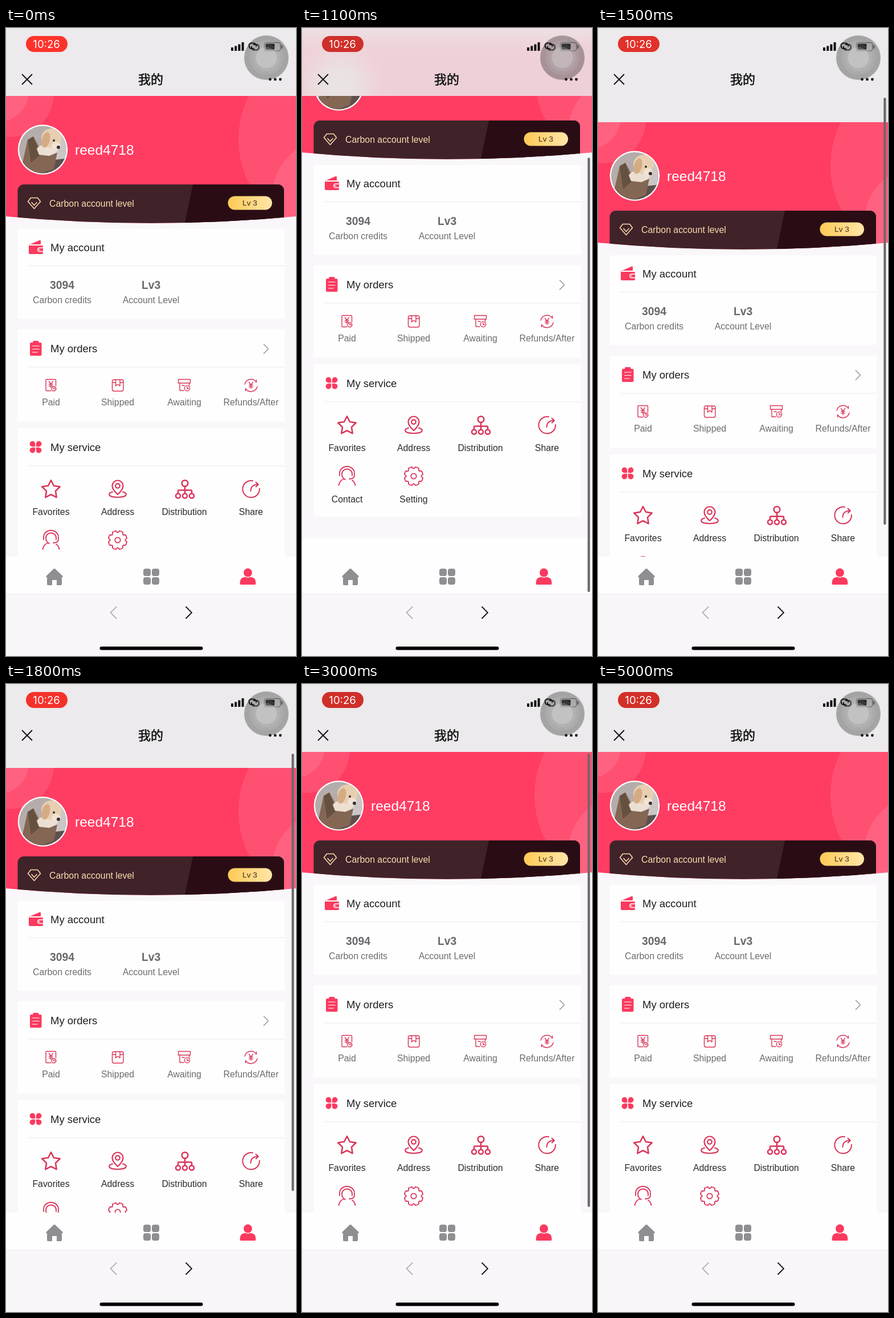
Recreate the animation shown at these times as an HTML page. Size 509 by 1100 pixels, loop 5.1 s.

```html
<!DOCTYPE html>
<html lang="en">
<head>
<meta charset="utf-8">
<title>Account page</title>
<style>
  html, body { margin: 0; width: 100%; height: 100%; overflow: hidden; background: #eceaec; }
  svg { display: block; width: 509px; height: 1100px; font-family: "Liberation Sans", Arial, sans-serif; }
  .h { font-size: 18.5px; fill: #1f1f22; }
  .num { font-size: 19.3px; font-weight: bold; fill: #68686c; }
  .sub { font-size: 15.85px; fill: #6c6c70; }
  .item { font-size: 15.85px; fill: #2a2a2d; }
  .mid { text-anchor: middle; }
  .line { fill: none; stroke: #da3358; stroke-linecap: round; stroke-linejoin: round; }
  .thin { stroke-width: 1.4; }
  .bold { stroke-width: 2.5; }
  .solid { fill: #fb3a5f; }
</style>
</head>
<body>
<svg viewBox="0 0 509 1100">
  <defs>
    <linearGradient id="gold"><stop stop-color="#ffca55"/><stop offset="1" stop-color="#ffe6a8"/></linearGradient>
    <clipPath id="banner"><path d="M0 119H509V330Q254.500 353.500 0 330Z"/></clipPath>
    <clipPath id="photo"><circle cx="64.500" cy="213" r="41.500"/></clipPath>
    <clipPath id="top"><rect width="509" height="119"/></clipPath>
    <filter id="blur" filterUnits="userSpaceOnUse" x="-150" y="-100" width="809" height="500"><feGaussianBlur stdDeviation="20"/></filter>
  </defs>

  <rect width="509" height="1100" fill="#edebed"/>

  <g id="page">
    <rect y="300" width="509" height="706" fill="#faf7fb"/>
    <rect y="1006" width="509" height="300" fill="#fefefe"/>

    <g clip-path="url(#banner)">
      <rect y="119" width="509" height="240" fill="#ff3c62"/>
      <g fill="#fff" fill-opacity=".1">
        <circle cx="8" cy="115" r="76"/>
        <circle cx="-15" cy="110" r="55"/>
        <circle cx="578" cy="195" r="170"/>
        <circle cx="567" cy="295" r="100"/>
      </g>
      <rect x="20.500" y="274" width="467.500" height="90" rx="11" fill="#402329"/>
      <path d="M328 274H477A11 11 0 0 1 488 285V345H313Z" fill="#2a0d14"/>
    </g>

    <circle cx="64.500" cy="213" r="43.700" fill="#fff"/>
    <g clip-path="url(#photo)">
      <rect x="20" y="168" width="90" height="90" fill="#b5adab"/>
      <rect x="84" y="168" width="26" height="66" fill="#cbc6c6"/>
      <path d="M20 238L110 228V260H20Z" fill="#5d4f4c"/>
      <path d="M28 240L38 196L48 190L60 212L90 218L84 247L58 256L34 252Z" fill="#836654"/>
      <path d="M38 196L48 190L60 222L44 236Z" fill="#66503f"/>
      <path d="M54 212Q60 202 74 206Q88 208 90 218L76 224L58 222Z" fill="#ecdfd2"/>
      <ellipse cx="80" cy="193" rx="18" ry="17" fill="#e9cfb2"/>
      <ellipse cx="70" cy="196" rx="7" ry="14" transform="rotate(14 70 196)" fill="#d4ac84"/>
      <ellipse cx="88" cy="207" rx="8" ry="7.500" fill="#f0e2d4"/>
      <circle cx="92" cy="209" r="3" fill="#38302f"/>
      <circle cx="84" cy="197" r="2" fill="#38302f"/>
    </g>
    <text x="121" y="221.500" font-size="24.500" fill="#fff">reed4718</text>

    <path d="M43.500 297.500H55.500L60.500 304L49.500 316.500L38.500 304ZM44.500 305L49.500 310.500L54.500 305" fill="none" stroke="#f9d9aa" stroke-width="1.600" stroke-linejoin="round"/>
    <text x="76" y="312.500" font-size="15.850" fill="#fbdcae">Carbon account level</text>
    <rect x="389.500" y="294.500" width="77.500" height="24" rx="12" fill="url(#gold)"/>
    <text class="mid" x="428" y="311" font-size="13.700" fill="#422a20">Lv 3</text>

    <g fill="#fefefe">
      <rect x="20.500" y="352" width="468.500" height="157"/>
      <rect x="20.500" y="528" width="468.500" height="161"/>
      <rect x="20.500" y="701" width="468.500" height="267"/>
    </g>
    <path d="M40 416.500H489M40 594H489M40 767H489" stroke="#ebeaee" stroke-width="1.200"/>

    <!-- section heads -->
    <path class="solid" d="M40 380L59.500 371.500Q61 371 61 373V379H40ZM40 381H63Q65 381 65 383V394Q65 396 63 396H42Q40 396 40 394Z"/>
    <path d="M65 385H58.500A3.300 3.300 0 0 0 58.500 391.500H65" fill="none" stroke="#fff" stroke-width="1.400"/>
    <path d="M57.500 388.200H60" stroke="#fff" stroke-width="1.500"/>
    <text class="h" x="78" y="391">My account</text>
    <text class="num mid" x="98.500" y="456.500">3094</text>
    <text class="num mid" x="254.500" y="456.500">Lv3</text>
    <text class="sub mid" x="98.500" y="481.500">Carbon credits</text>
    <text class="sub mid" x="254.500" y="481.500">Account Level</text>

    <rect class="solid" x="42" y="551" width="20.500" height="23" rx="2"/>
    <rect class="solid" x="47" y="548" width="10.500" height="6" rx="1.500"/>
    <path d="M46 557H58.500M46 562.500H58.500M46 568H55" stroke="#fff" stroke-width="1.200"/>
    <text class="h" x="78" y="568">My orders</text>
    <path d="M452 553.500L460.500 562L452 570.500" fill="none" stroke="#98979b" stroke-width="1.500"/>

    <g class="solid">
      <path id="petal" d="M51.200 733.200V728A4.800 4.800 0 1 0 46.200 733.200Z"/>
      <use href="#petal" transform="rotate(90 52 734)"/>
      <use href="#petal" transform="rotate(180 52 734)"/>
      <use href="#petal" transform="rotate(270 52 734)"/>
    </g>
    <text class="h" x="78" y="741">My service</text>

    <!-- order icons -->
    <g class="line thin">
      <path d="M79 635.500H71.500Q70 635.500 70 634V617Q70 615.500 71.500 615.500H86Q87.500 615.500 87.500 617V627"/>
      <circle cx="84" cy="632" r="3.800"/>
      <path d="M84 630V632H86"/>
      <path id="yen" d="M75.300 619L78.800 623.500L82.300 619M78.800 623.500V630M75.500 624H82M75.500 627H82"/>
      <rect x="186.500" y="616" width="19.500" height="20" rx="3"/>
      <path d="M187 621H192.500M200 621H205.500M192.500 616V627L196.200 624L200 627V616"/>
      <path d="M302.500 615.500H323.500V622H302.500ZM305 622V635H312M321.500 622V626M309 626H313"/>
      <circle cx="318" cy="631" r="4.600"/>
      <path d="M318 628.500V631.500H320.500"/>
      <path d="M419 624A11.300 11.300 0 0 1 439.500 620.500V616.500M441 628A11.300 11.300 0 0 1 420.500 631.500V635.500"/>
      <use href="#yen" transform="translate(351.200 1.500)"/>
    </g>
    <g class="sub mid">
      <text x="79" y="661">Paid</text>
      <text x="196" y="661">Shipped</text>
      <text x="313" y="661">Awaiting</text>
      <text x="430" y="661">Refunds/After</text>
    </g>

    <!-- service icons -->
    <g class="line bold">
      <path transform="translate(79 808.500)" d="M0-16.300L4.900-6.800L15.700-5L8 2.700L9.700 13.600L0 8.700L-9.700 13.600L-8 2.700L-15.700-5L-4.900-6.800Z"/>
      <path d="M196 817Q186.500 808.500 186.500 802A9.500 9.500 0 0 1 205.500 802Q205.500 808.500 196 817Z" stroke-width="2.200"/>
      <circle cx="196" cy="802" r="3.800" stroke-width="2.200"/>
      <path d="M187 812.500C177 815 179 822 196 822S215 815 205 812.500" stroke-width="2.200"/>
      <circle cx="314" cy="797.500" r="5.300"/>
      <path d="M314 803V815M302 815V811Q302 809.500 304 809.500H324Q326 809.500 326 811V815"/>
      <circle cx="302" cy="819.500" r="4"/>
      <circle cx="314" cy="819.500" r="4"/>
      <circle cx="326" cy="819.500" r="4"/>
      <path d="M433 793A14.800 14.800 0 1 0 445 807" stroke-width="2"/>
      <path d="M429.500 811Q429.500 800 442.500 799.500M438.500 795.500L442.800 799.500L438.800 803.500" stroke-width="2"/>
    </g>
    <g class="line" stroke-width="1.800">
      <path d="M66 896V892A13 12 0 0 1 92 892V896Q92 901 83 902"/>
      <path d="M70 893A9 8.500 0 0 1 88 893M70 891V896Q72 901 76 903M88 891V896"/>
      <path d="M64.500 913Q66 904 74 902M93.500 913Q92.500 907 88 904"/>
      <path id="gear"/>
      <circle cx="196" cy="897" r="4.700"/>
    </g>
    <g class="item mid">
      <text x="79" y="852.500">Favorites</text>
      <text x="196" y="852.500">Address</text>
      <text x="313" y="852.500">Distribution</text>
      <text x="430" y="852.500">Share</text>
      <text x="79" y="942.500">Contact</text>
      <text x="196" y="942.500">Setting</text>
    </g>
  </g>

  <!-- tab bar and browser bar -->
  <rect y="926" width="509" height="65" fill="#fefefe"/>
  <rect y="991" width="509" height="109" fill="#f8f6f9"/>
  <path d="M0 991.500H509" stroke="#eae8ec"/>
  <path d="M70.500 960L83.500 947.500Q85 946 86.500 947.500L99.500 960Q100.500 962 98 962V974Q98 976 96 976H89V967H81V976H74Q72 976 72 974V962Q69.500 962 70.500 960Z" fill="#8f8e92"/>
  <g fill="#8f8e92">
    <rect x="241" y="947" width="13" height="13" rx="4"/>
    <rect x="256" y="947" width="13" height="13" rx="4"/>
    <rect x="241" y="962" width="13" height="13" rx="4"/>
    <rect x="256" y="962" width="13" height="13" rx="4"/>
  </g>
  <circle class="solid" cx="424.500" cy="954" r="7.500"/>
  <path class="solid" d="M410.500 973Q410.500 962 420 961.500Q424.500 964 429 961.500Q438.500 962 438.500 973Q438.500 975 436.500 975H412.500Q410.500 975 410.500 973Z"/>
  <g fill="none" stroke-width="1.800">
    <path d="M194 1013.500L183.500 1024L194 1034.500" stroke="#b3b1b5"/>
    <path d="M315.500 1013.500L326 1024L315.500 1034.500" stroke="#111"/>
  </g>
  <rect x="164.500" y="1083.500" width="181" height="6" rx="3" fill="#000"/>

  <rect id="bar" x="501.300" width="4.200" rx="2.100" fill="#6b696c"/>

  <!-- title bar -->
  <rect width="509" height="119" fill="#eceaec"/>
  <g clip-path="url(#top)" opacity=".14">
    <g filter="url(#blur)">
      <rect id="tint" x="-120" width="749" fill="#ff3c62"/>
      <circle id="glow" cx="64.500" r="42" fill="#d5cdb8"/>
    </g>
  </g>
  <rect id="pill" x="35" y="14" width="73" height="28" rx="14"/>
  <text class="mid" x="71" y="34.800" font-size="18.500" fill="#fff" style="font-family:Inter,sans-serif">10:26</text>
  <path d="M28 81L46 99M46 81L28 99" stroke="#161616" stroke-width="2"/>
  <text class="mid" lang="zh" x="254" y="98" font-size="22" fill="#161616" stroke="#161616" stroke-width=".6" style="font-family:'Noto Sans CJK SC','Noto Sans CJK',sans-serif">我的</text>
  <path d="M397 40V34M403.200 40V31.500M409.400 40V28.500M415.600 40V25" stroke="#111" stroke-width="4"/>
  <g fill="none" stroke="#1c1c1c" stroke-width="2">
    <path d="M436 36H430A5 5 0 0 1 430 26.500H435A5 5 0 0 1 439 33"/>
    <path d="M434 29H440.500A5 5 0 0 1 440.500 38.500H435A5 5 0 0 1 431 32"/>
  </g>
  <rect x="453.500" y="25.500" width="28.500" height="14.500" rx="4" fill="none" stroke="#777" stroke-width="1.200"/>
  <path d="M484.500 30V36" stroke="#777" stroke-width="2"/>
  <rect x="455.500" y="27.500" width="16" height="10.500" rx="2" fill="#1a1a1a"/>
  <circle cx="457" cy="52" r="39" fill="#000" fill-opacity=".3"/>
  <g fill="#fff">
    <circle cx="457" cy="52" r="30" fill-opacity=".08"/>
    <circle cx="457" cy="52" r="24" fill-opacity=".08"/>
    <circle cx="457" cy="52" r="18.500" fill-opacity=".2"/>
  </g>
  <g fill="#161616">
    <circle cx="463.500" cy="90" r="2.400"/>
    <circle cx="472.500" cy="90" r="2.400"/>
    <circle cx="481.500" cy="90" r="2.400"/>
  </g>
</svg>

<script>
const LOOP = 5100, STEP = 100, PULSE = 2080, MAX_SCROLL = 79;
// scroll distance per step; past the end of the list the page rests at 0
const scroll = [0, 1, 4, 11, 22, 37.3, 80, 104, 113, 115, 114, 112, 66, 16,
  -24, -46, -52, -44, -28, -14, -6, -2, 0];
const bright = [252, 51, 43], dark = [207, 47, 41];

const el = id => document.getElementById(id);
const set = (id, attrs) => {
  for (const [k, v] of Object.entries(attrs)) el(id).setAttribute(k, v);
};
const clamp = (v, a, b) => Math.min(b, Math.max(a, v));

// a circle with rounded notches
function gearPath(cx, cy, notches) {
  const pts = [], count = notches * 12;
  for (let i = 0; i < count; i++) {
    const a = i / count * 2 * Math.PI;
    const r = 16.4 - 3.2 * Math.max(0, Math.cos(a * notches));
    pts.push((cx + r * Math.sin(a)).toFixed(1) + " " + (cy - r * Math.cos(a)).toFixed(1));
  }
  return "M" + pts.join("L") + "Z";
}

function draw(time) {
  const step = Math.floor(time % LOOP / STEP);
  const y = scroll[step] || 0;
  set("page", { transform: `translate(0 ${-y})` });

  const under = Math.max(0, y);
  set("tint", { y: 119 - under, height: 2 * under });
  set("glow", { cy: 213 - y, opacity: y > 50 ? 1 : 0 });

  // the scroll bar shrinks when the page is pulled past either end
  const top = 122 + 0.91 * under + Math.max(0, y - MAX_SCROLL) * 0.09;
  const bottom = Math.min(988, 916 + (y > 0 ? 0.91 * y : y));
  const shown = step < 1 ? 0 : clamp((37 - step) / 6, 0, 1);
  set("bar", { y: top, height: bottom - top, opacity: shown });

  const k = (1 - Math.cos(2 * Math.PI * step * STEP / PULSE)) / 2;
  set("pill", { fill: `rgb(${bright.map((c, i) => Math.round(c + (dark[i] - c) * k))})` });
}

function tick() {
  draw(performance.now());
  requestAnimationFrame(tick);
}

set("gear", { d: gearPath(196, 897, 8) });
tick();
</script>
</body>
</html>
```
